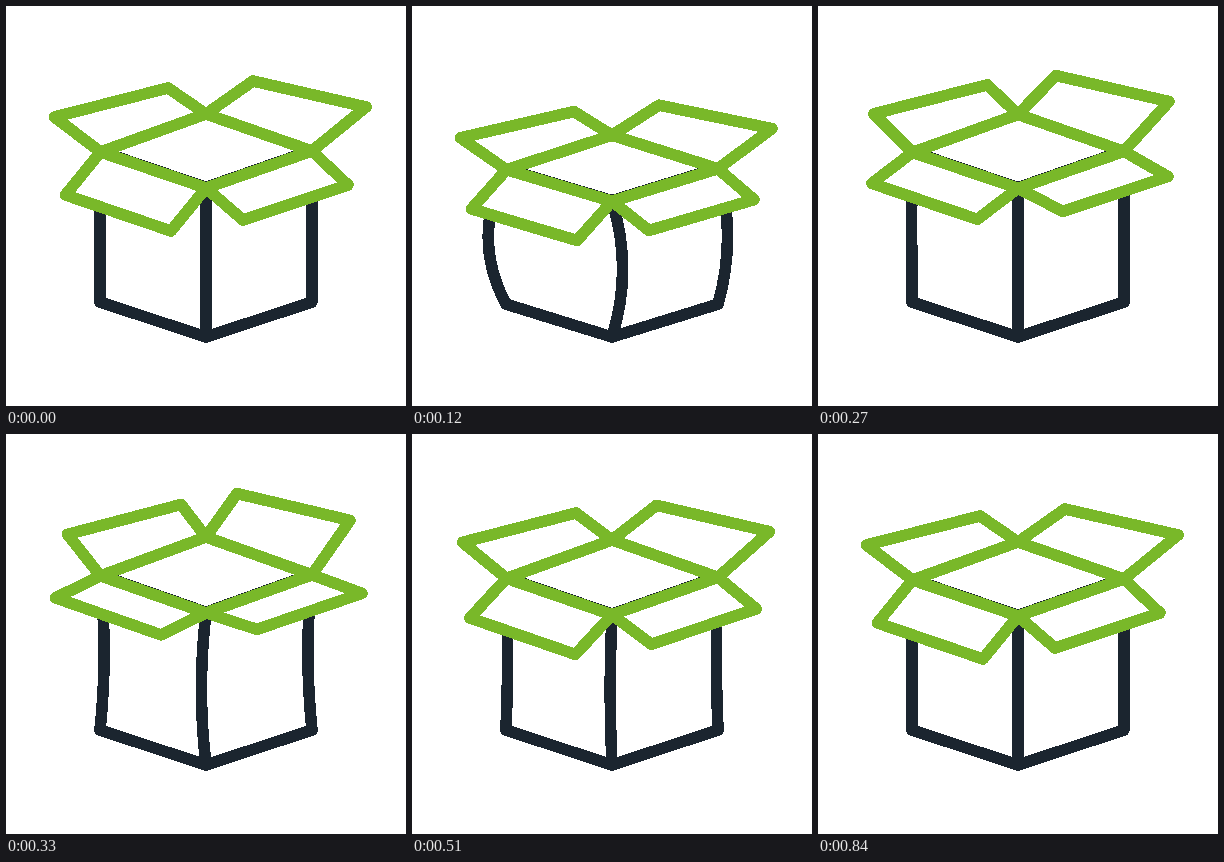
Recreate the animation shown at these times as an HTML page. Size 400 px wide and 400 px high, loop 2900 ms.

```html
<!DOCTYPE html>
<html lang="en">
<head>
<meta charset="utf-8">
<title>Bouncing box</title>
<style>
html, body { margin: 0; width: 100%; height: 100%; overflow: hidden; background: #fff; }
svg { display: block; width: 100%; height: 100%; }
path { stroke-width: 11.6; stroke-linejoin: round; stroke-linecap: round; shape-rendering: crispEdges; }
#body { fill: none; stroke: #1b252f; }
#lid { fill: #fff; stroke: #79b829; }
</style>
</head>
<body>
<svg viewBox="0 0 400 400"><path id="body"/><path id="lid"/></svg>
<script>
const LOOP = 2900, STEP = 30;
const body = document.getElementById('body');
const lid = document.getElementById('lid');

// [time, value] keys: how far the rim sinks, and how far the flaps swing up
const SINK = [[0, 0], [60, 10], [130, 18], [210, 11.7], [310, -4.2], [450, -2.6], [630, -0.2], [840, 0]];
const SWING = [[0, 0], [130, 0], [210, 0.08], [330, 1], [450, 0.28], [630, 0.03], [840, 0]];

// Smooth curve through the keys, flat at peaks and ends
function sample(keys, t) {
  const last = keys.length - 1;
  if (t >= keys[last][0]) return keys[last][1];
  const i = keys.findIndex(k => k[0] > t) - 1;
  const slope = j => {
    if (j <= 0 || j >= last) return 0;
    const [a, b, c] = keys.slice(j - 1, j + 2);
    const m = (b[1] - a[1]) / (b[0] - a[0]);
    const n = (c[1] - b[1]) / (c[0] - b[0]);
    return m * n > 0 ? 2 * m * n / (m + n) : 0;
  };
  const [t0, v0] = keys[i], [t1, v1] = keys[i + 1];
  const h = t1 - t0, s = (t - t0) / h, r = 1 - s;
  return v0 * r * r * (1 + 2 * s) + v1 * s * s * (3 - 2 * s)
    + h * s * r * (r * slope(i) - s * slope(i + 1));
}

const add = (p, q) => [p[0] + q[0], p[1] + q[1]];
const poly = points => 'M' + points.join('L') + 'Z';

function draw(t) {
  const sink = sample(SINK, t), swing = sample(SWING, t);
  const press = Math.max(sink, 0);
  const squash = 1 - 0.005 * press;
  const bulge = sink * (sink > 0 ? 0.6 : 1.1);

  const left = [94.5, 146 + sink], right = [306, 145 + sink];
  const back = [200, 108 + sink * 1.2], front = [200, 182 + sink * 0.75];

  // A flap hinges on a rim edge; its corners hang off by a rest offset plus the swing
  const flap = (a, b, restA, restB, lift) => {
    const corner = (p, rest) =>
      add(p, [rest[0] + lift[0] * swing, rest[1] * squash + lift[1] * swing]);
    return poly([a, corner(a, restA), corner(b, restB), b]);
  };
  const leg = (top, foot, bend) =>
    `M${top}Q${[foot[0] + 2 * bend, (top[1] + foot[1]) / 2]} ${foot}`;

  const footY = 296 + 0.12 * press;
  const footL = [94, footY], footR = [306, footY], footF = [200, 331];
  const up = p => add(p, [0, -0.6]);
  body.setAttribute('d',
    leg([94, left[1]], footL, -sink) + 'L' + footF + 'L' + footR +
    leg(right, footR, 0.9 * bulge) +
    leg(front, footF, bulge) +
    'M' + [left, front, right].map(up).join('L'));

  lid.setAttribute('d',
    flap(back, left, [-38, -26], [-46, -35], [13, -6.5]) +
    flap(back, right, [47, -33], [54, -44], [-16, -10.5]) +
    flap(left, front, [-35, 43], [-35, 43], [-10, -21]) +
    flap(front, right, [37, 32], [36, 34], [14, -15.5]));
}

const start = performance.now();
function tick() {
  const t = (performance.now() - start) % LOOP;
  draw(Math.floor(t / STEP) * STEP);
  requestAnimationFrame(tick);
}
tick();
</script>
</body>
</html>
```
